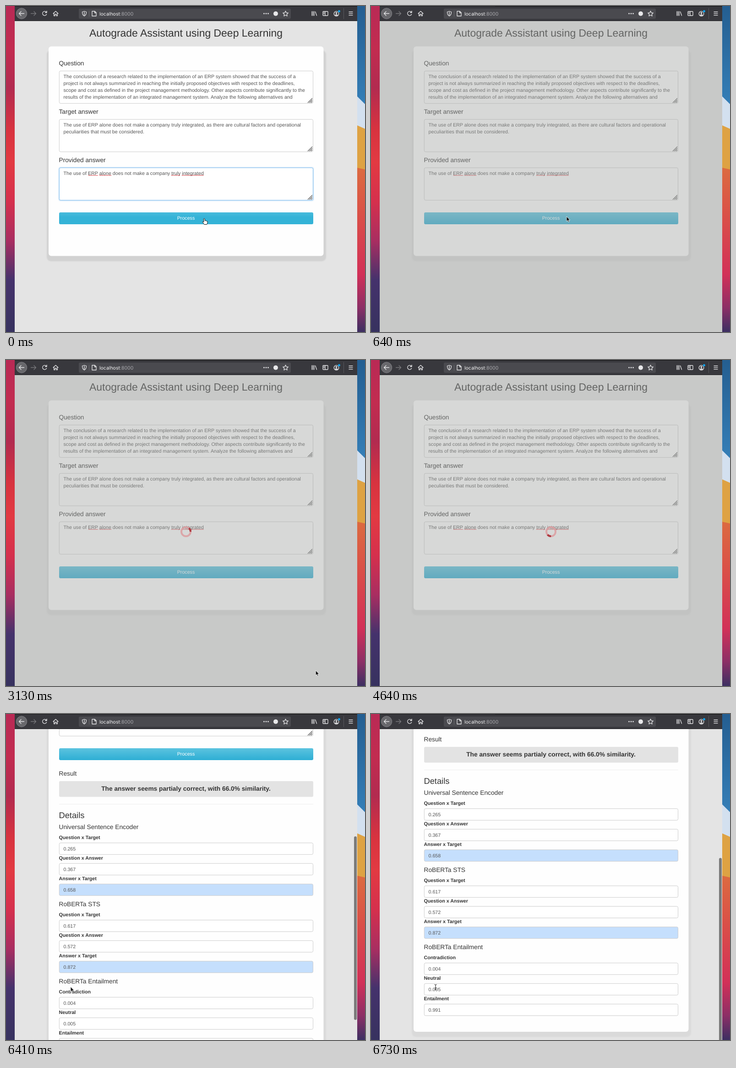
Write an HTML page that moves like this. It is 784 px wide and 714 px high and loops after 8000 ms.

```html
<!DOCTYPE html>
<html lang="en">
<head>
<meta charset="utf-8">
<title>Autograde Assistant</title>
<style>
  html, body { margin: 0; width: 100%; height: 100%; overflow: hidden; background: #e4e4e4; }
  svg { display: block; width: 784px; height: 714px; text-rendering: geometricPrecision; }
  text { font: 10.69px "Liberation Sans", Arial, sans-serif; fill: #333; white-space: pre; }
  .h1 { font-size: 22.95px; }
  .h3 { font-size: 18.3px; }
  .h4 { font-size: 13.72px; }
  .bold { font-weight: bold; }
  .mid { text-anchor: middle; }
  .value { fill: #555; }
  .white { fill: #fff; }
  .url { font: 10.5px Inter, sans-serif; fill: #f4f4f5; }
  .field { fill: #fff; stroke: #ccc; }
  .icon { fill: none; stroke: #e8e8ea; stroke-width: 1.3; stroke-linecap: round; stroke-linejoin: round; }
</style>
</head>
<body>
<svg viewBox="0 0 784 714">
  <defs>
    <linearGradient id="left" x2="0" y2="1">
      <stop stop-color="#b92a55"/><stop offset=".13" stop-color="#c22c50"/>
      <stop offset=".25" stop-color="#b22b50"/><stop offset=".38" stop-color="#d8333f"/>
      <stop offset=".48" stop-color="#e23a42"/>
      <stop offset=".6" stop-color="#d5304d"/><stop offset=".72" stop-color="#a92e61"/>
      <stop offset=".84" stop-color="#45326c"/><stop offset="1" stop-color="#37325f"/>
    </linearGradient>
    <linearGradient id="blue" x2="0" y2="1">
      <stop stop-color="#245e91"/><stop offset="1" stop-color="#357fb8"/>
    </linearGradient>
    <linearGradient id="red" x2="0" y2="1">
      <stop stop-color="#dc6a40"/><stop offset=".3" stop-color="#da4f48"/>
      <stop offset=".65" stop-color="#d23058"/><stop offset=".85" stop-color="#8d2f66"/>
      <stop offset="1" stop-color="#3c2f62"/>
    </linearGradient>
    <linearGradient id="info" x2="0" y2="1">
      <stop stop-color="#5bc3df"/><stop offset="1" stop-color="#2eaed4"/>
    </linearGradient>
    <linearGradient id="hover" x2="0" y2="1">
      <stop stop-color="#48bbdc"/><stop offset=".4" stop-color="#34b3d7"/>
    </linearGradient>
    <filter id="soft" x="-5%" y="-5%" width="110%" height="110%"><feGaussianBlur stdDeviation="1.2"/></filter>
    <clipPath id="view"><rect x="19" y="33" width="748" height="681"/></clipPath>
  </defs>

  <!-- desktop -->
  <rect width="20" height="714" fill="url(#left)"/>
  <rect x="766" width="18" height="220" fill="url(#blue)"/>
  <path d="M766 197L784 215V275H766Z" fill="#d3e0ef"/>
  <path d="M766 261L784 269V360H766Z" fill="#dea243"/>
  <path d="M766 354L784 358V714H766Z" fill="url(#red)"/>

  <!-- page -->
  <g clip-path="url(#view)">
    <rect x="19" y="33" width="748" height="681" fill="#e4e4e4"/>
    <g id="page">
      <rect id="shadow" x="89" y="97" width="610" rx="9" fill="#d2d2d2" filter="url(#soft)"/>
      <rect id="card" x="93" y="88.5" width="600.5" rx="6" fill="#fefefe"/>
      <g id="form"></g>
      <g id="results"></g>
    </g>
    <rect id="thumb" x="760" width="6" rx="3" fill="#7b7b7b"/>
    <rect id="overlay" x="19" y="33" width="748" height="681" fill="#a3a5a2"/>
    <g id="spinner" fill="none" stroke-width="4">
      <circle cx="393" cy="376" r="10" stroke="#dc9ea0" opacity=".85"/>
      <path id="arc" d="M388.77 366.94A10 10 0 0 1 397.23 366.94" stroke="#ad3a40"/>
    </g>
  </g>

  <!-- browser bar -->
  <rect x="19" width="748" height="33" fill="#38383d"/>
  <path d="M19 .5H767" stroke="#19191b"/>
  <path d="M271 .5H767" stroke="#0a0a0b"/>
  <path d="M19 32.5H767" stroke="#242427"/>
  <rect x="159" y="5.5" width="463" height="22.5" rx="3" fill="#4a4a4f"/>
  <circle cx="34" cy="16.5" r="11.7" fill="#68686c" stroke="#8a8a8e" stroke-width=".8"/>
  <g class="icon">
    <path d="M39.500 16.500H29M33 12L28.500 16.500L33 21"/>
    <path d="M54.500 16.500H65M61 12L65.500 16.500L61 21" stroke="#77777b"/>
    <path d="M88 13.500A4.600 4.600 0 1 0 88.600 18M89 11V14.500H85.500"/>
    <path d="M103 16.500L108.500 11.500L114 16.500M104.700 16V21.500H107V18H110V21.500H112.300V16"/>
    <path d="M166.500 13L171 11.500L175.500 13C175.500 18 174 20.500 171 22C168 20.500 166.500 18 166.500 13ZM171 13.500V20"/>
    <path d="M181.500 11V23" stroke="#68686c" stroke-width="1"/>
    <path d="M188 11.500H194L197 14.500V22H188ZM193.500 11.500V15H197"/>
    <path d="M610.500 11L612.200 14.700L616.200 15.200L613.300 18L614 22L610.500 20L607 22L607.700 18L604.800 15.200L608.800 14.700Z"/>
    <path d="M668 12V21M670.500 12V21M673 12V21M675.500 12.500L678.500 21"/>
    <path d="M693 12H702Q703 12 703 13V20Q703 21 702 21H693Q692 21 692 20V13Q692 12 693 12ZM697 12V21M693.800 14.500H695.200M693.800 17H695.200"/>
    <circle cx="721.500" cy="17" r="5.300"/>
    <path d="M737.500 5V28" stroke="#5a5a5e" stroke-width="1"/>
    <path d="M749 13H757M749 16.700H757M749 20.400H757"/>
  </g>
  <g fill="#e8e8ea">
    <circle cx="563.500" cy="16.700" r="1.400"/><circle cx="568" cy="16.700" r="1.400"/><circle cx="572.500" cy="16.700" r="1.400"/>
    <circle cx="589" cy="16.700" r="5"/>
    <circle cx="721.500" cy="15.300" r="1.900"/><path d="M718 20Q721.500 15.800 725 20Q721.500 22.500 718 20Z"/>
  </g>
  <circle cx="727.500" cy="11.500" r="2.700" fill="#10a8f5" stroke="#38383d" stroke-width=".6"/>
  <text class="url" x="204" y="20.500">localhost<tspan fill="#a9a9ad">:8000</tspan></text>

  <!-- pointers, each with its hot spot at 0,0 -->
  <g id="cursor">
    <path id="arrow" d="M0 0V10.600L2.500 8.400L4.200 12.200L6 11.400L4.400 7.800H7.700Z" fill="#111" stroke="#fff" stroke-width=".8"/>
    <path id="hand" d="M-1.500 1.200Q-1.500 0 -.300 0Q.900 0 1 1.200L1.400 4.800Q2.800 4 3.600 5.200Q5 4.600 5.600 5.800Q7.200 5.500 7.200 7.500Q7.200 10 5.600 13H-.100Q-1.600 10.500 -3.500 8.200Q-4.200 6.900 -3 6.600Q-1.900 6.600 -.900 7.800Z" fill="#fff" stroke="#111"/>
    <path id="beam" d="M-2.500 -5Q0 -5 0 -3.500Q0 -5 2.500 -5M0 -4V5M-2.500 6Q0 6 0 4.500Q0 6 2.500 6M-1.500 1.500H1.500" fill="none" stroke="#222"/>
  </g>
</svg>
<script>
const $ = id => document.getElementById(id);
const set = (id, attrs) => { for (const k in attrs) $(id).setAttribute(k, attrs[k]); };
const show = (id, on) => $(id).setAttribute('visibility', on ? 'visible' : 'hidden');

const text = (x, y, cls, s) => `<text x="${x}" y="${y}" class="${cls}">${s}</text>`;
const box = (y, h, extra = '') =>
  `<rect class="field" x="116.300" y="${y + .3}" width="554.200" height="${h}" rx="3" ${extra}/>`;
const area = (label, y, lines, extra) =>
  text(115.5, y - 12, 'h4', label) + box(y, 71, extra) +
  lines.map((s, i) => text(125.5, y + 15.7 + i * 15.24, 'value', s)).join('') +
  `<path d="M659 ${y + 70}l10 -10m-6.500 10l6.500 -6.500m-3 6.500l3 -3" stroke="#555" stroke-width="1.100"/>`;

const squiggles = [[180, 201], [204, 230], [361, 381], [384, 432]]
  .map(([a, b]) => `M${a} 371H${b}`).join('');

$('form').innerHTML =
  text(393, 67.3, 'h1 mid', 'Autograde Assistant using Deep Learning') +
  area('Question', 142, [
    'The conclusion of a research related to the implementation of an ERP system showed that the success of a',
    'project is not always summarized in reaching the initially proposed objectives with respect to the deadlines,',
    'scope and cost as defined in the project management methodology. Other aspects contribute significantly to the',
    'results of the implementation of an integrated management system. Analyze the following alternatives and']) +
  area('Target answer', 248, [
    'The use of ERP alone does not make a company truly integrated, as there are cultural factors and operational',
    'peculiarities that must be considered.']) +
  '<rect id="glow" x="115" y="353" width="557" height="74" rx="4" fill="#c6e1f7" filter="url(#soft)"/>' +
  area('Provided answer', 354, ['The use of ERP alone does not make a company truly integrated'], 'id="answer"') +
  `<path d="${squiggles}" stroke="#e0393e" stroke-width="1.400" stroke-dasharray="1.500 1"/>` +
  '<rect id="button" x="116" y="452" width="555" height="26" rx="3"/>' +
  text(393, 467.7, 'mid white', 'Process');

const pairs = ['Question x Target', 'Question x Answer', 'Answer x Target'];
const sections = [
  ['Universal Sentence Encoder', pairs, ['0.265', '0.367', '0.658'], true],
  ['RoBERTa STS', pairs, ['0.617', '0.572', '0.872'], true],
  ['RoBERTa Entailment', ['Contradiction', 'Neutral', 'Entailment'], ['0.004', '0.005', '0.991'], false]];

$('results').innerHTML =
  text(115.5, 512, 'h4', 'Result') +
  '<rect x="116" y="524" width="555" height="34.500" rx="3" fill="#e3e3e3"/>' +
  text(393, 545, 'h4 bold mid', 'The answer seems partialy correct, with 66.0% similarity.') +
  '<path d="M116 574.500H671" stroke="#eee"/>' +
  text(115.5, 604.7, 'h3', 'Details') +
  sections.map(([title, labels, values, marked], s) => {
    const top = 629 + s * 169;
    return text(115.5, top, 'h4', title) + labels.map((label, i) => {
      const y = top + 22 + i * 45;
      const fill = marked && i === 2 ? 'style="fill:#c5dffd"' : '';
      return text(115.5, y, 'bold', label) + box(y + 8, 25.4, fill) + text(125.5, y + 24.7, 'value', values[i]);
    }).join('');
  }).join('');

// Pointer path: time, x, y
const path = [[0, 433, 465.5], [150, 433, 465.5], [600, 427, 461], [2300, 427, 461],
  [3130, 676, 680], [3700, 737, 700], [4100, 740, 722], [6409, 740, 722], [6410, 141, 597.5], [8000, 141, 597.5]];

function pointer(t) {
  const i = path.findIndex(p => p[0] > t);
  const [a, b] = [path[i - 1], path[i]];
  const k = (t - a[0]) / (b[0] - a[0]);
  return [1, 2].map(c => a[c] + (b[c] - a[c]) * k);
}

function snap(t) {
  if (t < 150) return 0;
  if (t >= 6730) return 6730;
  if (t >= 6580) return 6580;
  if (t >= 6410) return 6410;
  return Math.max(150, 130 + 166.8 * Math.floor((t - 120) / 166.8));
}

function draw(time) {
  const t = snap(time % 8000);
  const start = t < 150, done = t >= 6410, end = t >= 6730;
  const scroll = !done ? 0 : end ? 452 : t >= 6580 ? 430 : 377;
  const bottom = done ? 1148 : 547.5;

  set('page', { transform: `translate(0 ${-scroll})` });
  set('card', { height: bottom - 88.5 });
  set('shadow', { height: bottom + 11.5 - 97, opacity: start ? 1 : .5 });
  show('results', done);
  show('glow', start);
  $('answer').style.stroke = start ? '#7dbbed' : '';
  set('button', { fill: start ? 'url(#hover)' : 'url(#info)' });

  show('thumb', done);
  set('thumb', { y: 268 + (scroll - 377) * .63, height: 402 });

  const fade = Math.min(1, Math.max(0, (t - 80) / 450));
  set('overlay', { opacity: start || done ? 0 : fade * .43 });
  show('spinner', t > 900 && !done);
  set('arc', { transform: `rotate(${65 + (t - 3130) * 360 / 1085} 393 376)` });

  const [x, y] = pointer(t);
  set('cursor', { transform: `translate(${x} ${y})` });
  show('hand', start);
  show('beam', end);
  show('arrow', !start && !end);
}

const began = performance.now();
(function tick() {
  draw(performance.now() - began);
  requestAnimationFrame(tick);
})();
</script>
</body>
</html>
```
